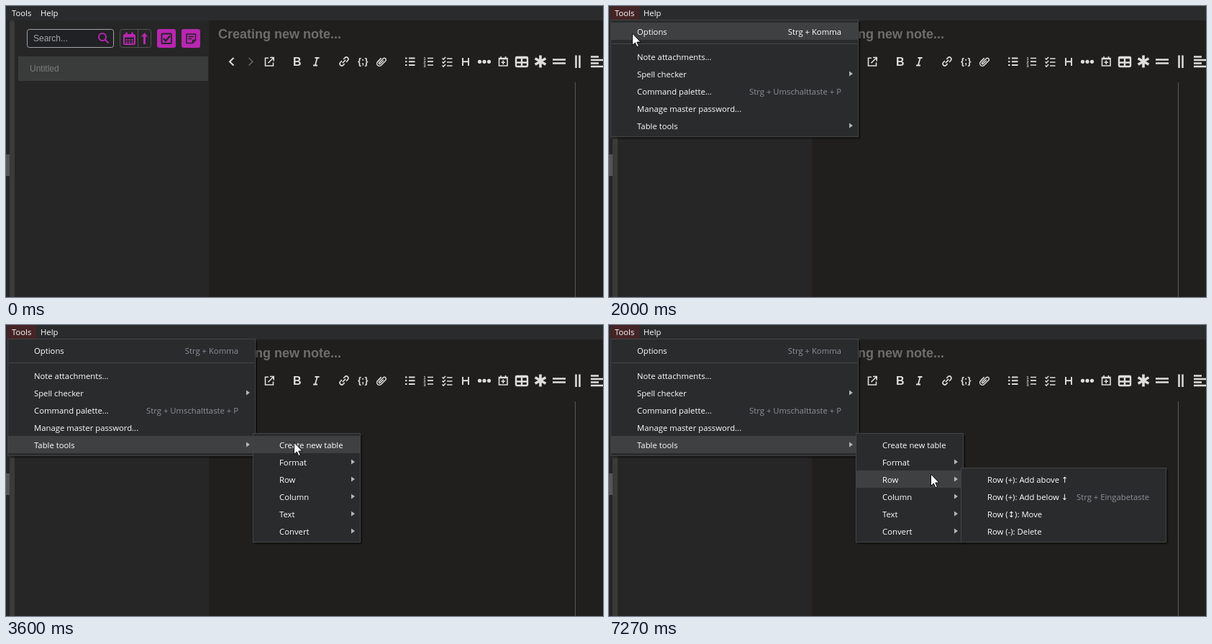
Write an HTML page that moves like this. It is 830x404 px and loops after 8 s.

```html
<!DOCTYPE html>
<html lang="en">
<head>
<meta charset="utf-8">
<title>Table tools menu</title>
<style>
html, body { margin: 0; width: 100%; height: 100%; overflow: hidden; background: #201f1d; }
svg { display: block; }
text { font: 11.3px "Open Sans", "Noto Sans", "DejaVu Sans", sans-serif; fill: #fff; white-space: pre; }
.ui text { font: 12px "Liberation Sans", Arial, sans-serif; fill: #7b7c7b; }
.ui .title { font-size: 18px; font-weight: bold; fill: #6f6e6c; }
.ui .bold { font-size: 16px; font-weight: bold; fill: #dededc; }
.ui .code { font-size: 13px; font-weight: bold; fill: #dededc; }
.ui .num { font-size: 5.5px; font-weight: bold; fill: #dededc; }
.line { fill: none; stroke: #dededc; stroke-width: 1.6; }
.pink { fill: none; stroke: #b926b1; stroke-width: 2; }
.dark { fill: none; stroke: #242426; stroke-width: 1.8; }
.menu .key { fill: #8d9299; }
.menu .on .key { fill: #fff; }
.menu .hover { fill: none; }
.menu .on .hover { fill: #3e4042; }
</style>
</head>
<body>
<svg id="stage" width="830" height="404" viewBox="0 0 830 404">
  <rect width="830" height="404" fill="#201f1d"/>
  <rect y="20" width="282" height="384" fill="#262626"/>
  <rect width="830" height="20" fill="#292b2d"/>
  <path d="M5 404V24q0-4 3.500-4t3.500 4V404z" fill="#3a3a3a"/>
  <rect y="206" width="5" height="30" fill="#555"/>
  <rect x="17" y="70" width="264" height="34" fill="#3a3c3b"/>
  <path d="M791.500 106V404" stroke="#595856"/>
  <rect id="tools" x="2" width="40" height="19" fill="#452426"/>
  <text x="8" y="14">Tools</text>
  <text x="48" y="14">Help</text>

  <g class="ui">
    <text class="title" x="295" y="45">Creating new note...</text>
    <text x="33" y="91">Untitled</text>
    <rect x="29.500" y="32.500" width="120" height="25" rx="3" fill="#202124" stroke="#a4a4a4"/>
    <text x="38" y="49" style="fill:#a3a5a7">Search...</text>
    <rect x="158.500" y="32.500" width="43" height="25" rx="3" fill="none" stroke="#535355"/>
    <path d="M183.500 33V57" stroke="#535355"/>
    <g class="pink">
      <circle cx="134" cy="43" r="5"/>
      <path d="M137.500 46.500L142.500 51.500"/>
      <rect x="164" y="40" width="15" height="13" rx="1.500"/>
      <path d="M164 41.500H179" stroke-width="4"/>
      <path d="M167.500 36.500V40M175.500 36.500V40" stroke-width="2.500"/>
      <path d="M166.500 47H177M166.500 50.300H177" stroke-dasharray="2.200 1.800"/>
      <path d="M192.500 53V40" stroke-width="3"/>
      <path d="M188 42.500L192.500 37 197 42.500z" fill="#b926b1" stroke="none"/>
    </g>
    <rect x="210" y="32" width="26" height="26" rx="3" fill="#b926b1"/>
    <rect x="244" y="32" width="26" height="26" rx="3" fill="#b926b1"/>
    <g class="dark">
      <rect x="216.500" y="38.500" width="13.500" height="13.500" rx="1"/>
      <path d="M219 45L222 48.500 228 41.500" stroke-width="2.200"/>
      <path d="M251 39H263.500V47.500L259.500 51.500H251zM263 47.500H259.500V51.500M253.500 42.500H261M253.500 45.500H258" stroke-width="1.500"/>
    </g>

    <g class="line">
      <path d="M316.500 72L311 77.200 316.500 82.500" stroke-width="2"/>
      <path d="M337.500 72L343 77.200 337.500 82.500" stroke="#656462"/>
      <path d="M365 72.200H360.500V83H371.500V78.500M367 71.500H372.200V76.500M372 71.800L364.500 79.300"/>
      <path d="M429.500 72H435.500M427 82.500H433M432.700 72L429.800 82.500" stroke-width="1.800"/>
      <g transform="translate(470 77) rotate(-45)">
        <path d="M-1.500 2.700H-4.500a2.700 2.700 0 0 1 0-5.400H-1.500M1.500-2.700H4.500a2.700 2.700 0 0 1 0 5.400H1.500M-3 0H3"/>
      </g>
      <g transform="translate(522 77) rotate(45)">
        <path d="M-3.500-3V4a3.500 3.500 0 0 0 7 0V-4.500a2.300 2.300 0 0 0-4.600 0V3.500a1 1 0 0 0 2.200 0V-3" stroke-width="1.500"/>
      </g>
      <path d="M555 72.500h2.500M555 77.200h2.500M555 82h2.500M560 72.500h8.500M560 77.200h8.500M560 82h8.500" stroke-width="1.900"/>
      <path d="M586 72.500h8M586 77.200h8M586 82h8" stroke-width="1.700"/>
      <path d="M613 73h7.500M613 78h7.500M613 83h7.500M606.500 72.500l1.600 1.600 3-3.200M606.500 77.500l1.600 1.600 3-3.200M606.500 82.500l1.600 1.600 3-3.200" stroke-width="1.500"/>
      <path d="M635 72V83M643 72V83M635 77.300H643" stroke-width="1.900"/>
      <path d="M685.500 72.500H697V83H685.500zM685.500 73.500H697M688 70V72M694.500 70V72M691.200 75.500V81M688.500 78.200H694"/>
      <rect x="709" y="71" width="16" height="13" rx="1.200" stroke-width="2.400"/>
      <path d="M709 72H725M717 72V84M709 78.500H725" stroke-width="2.400"/>
      <path d="M743 68.500V85.500M735.600 72.700L750.400 81.300M735.600 81.300L750.400 72.700" stroke-width="3.600"/>
      <path d="M760 74.500H778M760 79.500H778" stroke-width="2.600"/>
      <path d="M792.500 68.500V86M797.500 68.500V86" stroke-width="2.500"/>
      <path d="M813 70.500H824M813 75H830M813 79.500H824M813 84H830" stroke-width="2.300"/>
    </g>
    <g fill="#dededc">
      <circle cx="658.500" cy="77.300" r="2.600"/><circle cx="665" cy="77.300" r="2.600"/><circle cx="671.500" cy="77.300" r="2.600"/>
    </g>
    <text class="bold" x="399" y="83">B</text>
    <text class="code" x="489" y="81">{;}</text>
    <text class="num" x="580.500" y="74.500">1</text>
    <text class="num" x="580.500" y="79.500">2</text>
    <text class="num" x="580.500" y="84.500">3</text>
  </g>
</svg>
<script>
const stage = document.getElementById('stage');
const tools = document.getElementById('tools');

function add(parent, tag, attrs, text) {
  const el = document.createElementNS('http://www.w3.org/2000/svg', tag);
  for (const k in attrs) el.setAttribute(k, attrs[k]);
  if (text) el.textContent = text;
  return parent.appendChild(el);
}

// Items: 'label', 'label|shortcut', 'label>' for a submenu, '-' for a separator.
function menu(x, y, w, items) {
  const g = add(stage, 'g', { class: 'menu' });
  const h = items.reduce((sum, item) => sum + (item === '-' ? 11 : 24), 8);
  for (let i = 3; i > 0; i--)
    add(g, 'rect', { x: x + 3, y: y + 3, width: w - 3 + i, height: h - 3 + i, rx: 2, fill: '#000', 'fill-opacity': .2 });
  add(g, 'rect', { x: x + .5, y: y + .5, width: w - 1, height: h - 1, fill: '#292b2d', stroke: '#424446' });
  const rows = [];
  let top = y + 4;
  for (const item of items) {
    if (item === '-') {
      add(g, 'path', { d: `M${x + 2} ${top + 5.5}H${x + w - 2}`, stroke: '#454749' });
      top += 11;
      continue;
    }
    const row = add(g, 'g', {});
    const [label, key] = item.replace('>', '').split('|');
    add(row, 'rect', { class: 'hover', x: x + 1, y: top, width: w - 2, height: 24 });
    add(row, 'text', { x: x + 37, y: top + 17 }, label);
    if (key) add(row, 'text', { class: 'key', x: x + w - 24, y: top + 17, 'text-anchor': 'end' }, key);
    if (item.endsWith('>'))
      add(row, 'path', { d: `M${x + w - 13} ${top + 8.5}l5 3.500-5 3.500z`, fill: '#b4b6b8' });
    rows.push({ row, top });
    top += 24;
  }
  return {
    show(opacity) {
      g.style.display = opacity > 0 ? '' : 'none';
      g.style.opacity = Math.min(1, opacity);
    },
    hover(py) {
      for (const r of rows) r.row.setAttribute('class', py >= r.top && py < r.top + 24 ? 'on' : '');
    }
  };
}

const main = menu(2, 19, 345, ['Options|Strg + Komma', '-', 'Note attachments...', 'Spell checker>',
  'Command palette...|Strg + Umschalttaste + P', 'Manage master password...', 'Table tools>']);
const table = menu(343, 150, 150, ['Create new table', 'Format>', 'Row>', 'Column>', 'Text>', 'Convert>']);
const format = menu(489, 174, 288, ['Format table|Strg + Umschalttaste + F', 'Format all tables',
  'Minify table', 'Minify all tables']);
const row = menu(489, 198, 286, ['Row (+): Add above ↑', 'Row (+): Add below ↓|Strg + Eingabetaste',
  'Row (↕): Move', 'Row (-): Delete']);
const cursor = add(stage, 'path', { d: 'M0 0V16.500L3.800 13 6.400 18.700 8.800 17.600 6.300 12H11.500z',
  fill: '#fff', stroke: '#000', 'stroke-width': .9 });

// Pointer path: tick, x, y, and an optional ease-out power for the way there.
const path = [
  [1, 816.5, 393], [13, 30.5, 18, 1.6], [28, 30.5, 18], [30, 32.5, 38], [34, 51.5, 120], [38, 52.5, 168, 1.5],
  [43, 52.5, 168], [46, 95, 168], [50, 262, 166], [52, 345, 164], [54, 400.5, 163], [55, 417.5, 165], [57, 428, 165],
  [61, 428, 165], [64, 447.5, 187], [100, 447.5, 187], [104, 447.5, 207]
];

function pointer(tick) {
  const i = path.findIndex(p => p[0] >= tick);
  if (i < 0) return path[path.length - 1].slice(1, 3);
  if (!i) return path[0].slice(1, 3);
  const [t0, x0, y0] = path[i - 1], [t1, x1, y1, power = 1] = path[i];
  const k = 1 - (1 - (tick - t0) / (t1 - t0)) ** power;
  return [x0 + (x1 - x0) * k, y0 + (y1 - y0) * k];
}

function draw(now) {
  // The screen is sampled 15 times a second.
  const tick = Math.floor(now % 8000 * 15 / 1000 + .1);
  const [x, y] = pointer(tick);
  const inTable = tick >= 43 && x >= 344;
  cursor.style.display = tick ? '' : 'none';
  cursor.setAttribute('transform', `translate(${x} ${y})`);
  tools.style.display = tick >= 21 ? '' : 'none';
  main.show((tick - 20.5) / 3);
  main.hover(inTable ? 168 : y);
  table.show(tick >= 43);
  table.hover(inTable ? y : -1);
  format.show(tick >= 70 && tick < 109);
  row.show(tick >= 109);
}

const start = performance.now();
function loop() {
  draw(performance.now() - start);
  requestAnimationFrame(loop);
}
loop();
</script>
</body>
</html>
```
